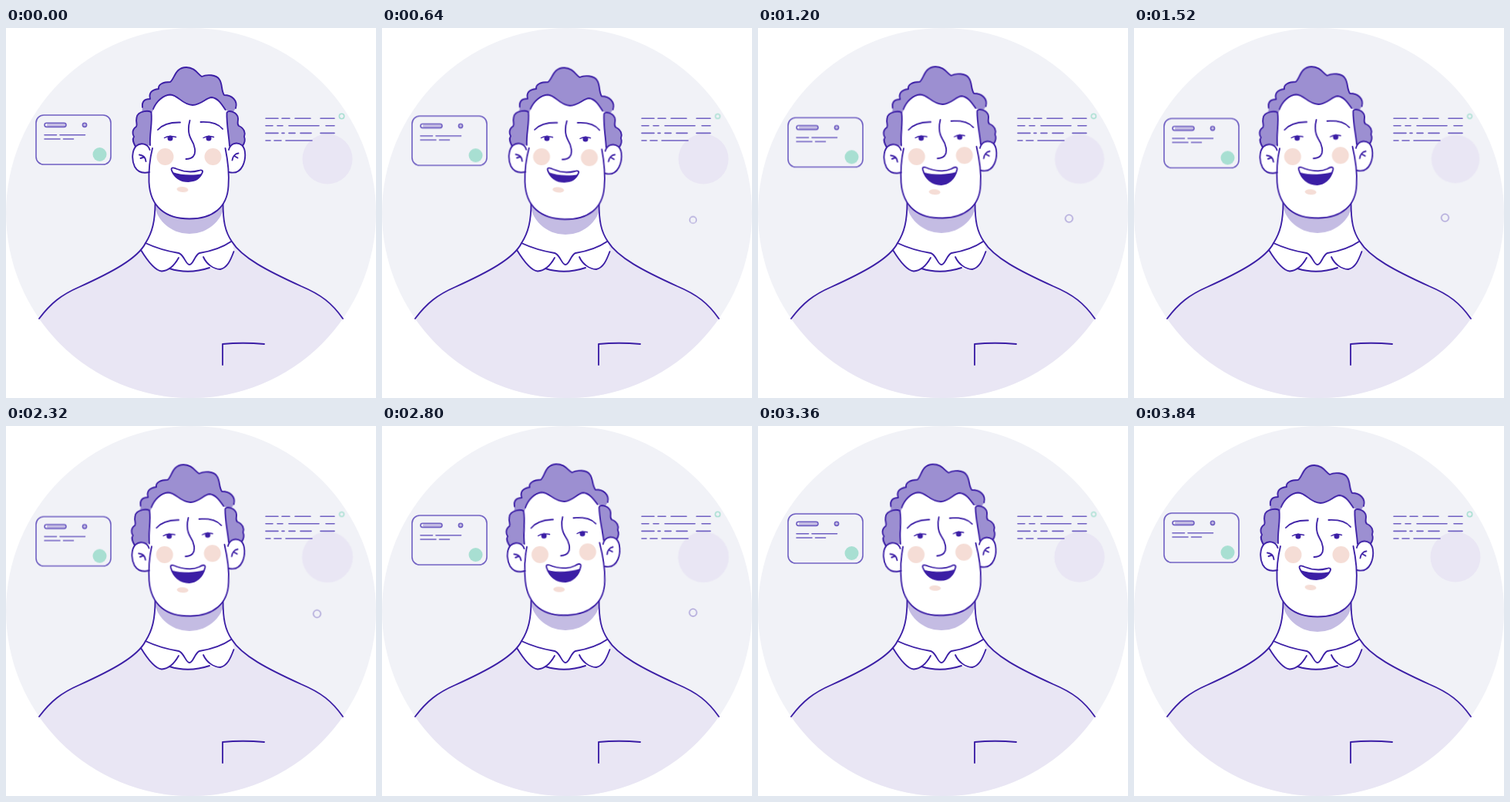
Write an HTML page that moves like this. It is 480x480 px and loops after 3.92 s.

```html
<!DOCTYPE html>
<html lang="en">
<head>
<meta charset="utf-8">
<title>Talking portrait</title>
<style>
  :root { --loop: 3920ms; --ink: #3b1ea5; --hair: #9c8fd1; --soft: #6f5fc2; --lilac: #e9e6f4; --shade: #c4bce3; --mint: #a8dfd2; }
  html, body { margin: 0; width: 100%; height: 100%; overflow: hidden; background: #fff; }
  svg { display: block; width: 100%; height: 100%; }
  .line { fill: none; stroke: var(--ink); stroke-width: 1.85; stroke-linecap: round; stroke-linejoin: round; }
  .skin { fill: #fff; }
  .hair { fill: var(--hair); }
  .blush { fill: #f5ddd6; }
  .thin { fill: none; stroke: var(--soft); stroke-width: 1.6; stroke-linecap: round; }
  .lid { stroke-width: 1.4; }

  .head, .nod, .card, .rise, .pop, .lip, .orb, .dot, .open, .shut, .mouth, .gape {
    animation-duration: var(--loop);
    animation-iteration-count: infinite;
    animation-timing-function: ease-in-out;
  }
  .head { animation-name: tilt; transform-origin: 203px 194px; }
  @keyframes tilt {
    0%, 100% { transform: rotate(0deg); }
    19.4% { transform: rotate(1.1deg); }
    29.3%, 57.9% { transform: rotate(-1.5deg); }
    78.6% { transform: rotate(-3.8deg); }
  }
  .nod { animation-name: nod; }
  @keyframes nod {
    0%, 100% { transform: translateY(0); }
    19.4% { transform: translateY(1px); }
    29.3%, 57.9% { transform: translateY(-1.2px); }
    78.6% { transform: translateY(-2.5px); }
  }

  .card { animation-name: bob; animation-timing-function: cubic-bezier(.364, 0, .636, 1); }
  @keyframes bob { 50% { transform: translateY(5px); } }

  .rise { animation-name: rise; animation-timing-function: linear; }
  @keyframes rise { from { transform: translate(403.5px, 251px); } to { transform: translate(403.5px, 238.5px); } }
  .pop { animation-name: pop; }
  @keyframes pop {
    0%, 9% { transform: scale(0); }
    16.3% { transform: scale(.9); }
    20%, 71% { transform: scale(1); }
    80.5%, 100% { transform: scale(0); }
  }

  .orb { animation-name: orb; transform-origin: 417px 170px; }
  @keyframes orb {
    0%, 25%, 100% { transform: scale(1); }
    39% { transform: scale(.96); }
    59% { transform: scale(1.015); }
  }
  .dot { animation-name: dot; animation-duration: calc(var(--loop) / 4); transform-origin: 435.5px 114.5px; }
  @keyframes dot { 50% { transform: scale(.9); } }

  .open, .shut { animation-timing-function: step-end; }
  .open { animation-name: open; }
  .shut { animation-name: shut; opacity: 0; }
  @keyframes open { 0% { opacity: 1; } 75.5% { opacity: 0; } 83.7%, 100% { opacity: 1; } }
  @keyframes shut { 0% { opacity: 0; } 75.5% { opacity: 1; } 83.7%, 100% { opacity: 0; } }

  .lip { animation-name: lip; }
  @keyframes lip {
    0%, 16.3%, 98%, 100% { transform: translateY(0); }
    28.6%, 74.5% { transform: translateY(4px); }
  }
  .mouth { animation-name: mouth; }
  @keyframes mouth {
    0%, 16.3%, 98%, 100% { d: path("M215 185C213 180 218 181 222 183C232 187 243 187 250 185C254 183.500 256 185 254.500 188C251 196 245 199 236.500 199C227 199 219 194 215 185Z"); }
    28.6%, 74.5% { d: path("M214 184C213 179 218 181 222 183C233 187 244 187 251 184C257 180.500 259 182 258.500 185C255 198 246 204 237.500 204C226 204 217 196 214 184Z"); }
  }
  .gape { animation-name: gape; }
  @keyframes gape {
    0%, 16.3%, 98%, 100% { d: path("M216 187C227 191 243 191.500 254.500 189C251 196 245 199 236.500 199C227 199 220 195 216 187Z"); }
    28.6%, 74.5% { d: path("M215 187.500C227 191.500 244 192 258 188C254 199 246 204 237.500 204C226 204 218 197 215 187.500Z"); }
  }
</style>
</head>
<body>
<svg viewBox="0 0 480 480">
  <defs>
    <clipPath id="disc"><circle cx="240" cy="240" r="240"/></clipPath>
    <clipPath id="throat"><path d="M193.500 215V228C193.500 250 190 265 181 279H293C284 265 281.500 250 281.500 226V215Z"/></clipPath>
  </defs>

  <circle cx="240" cy="240" r="240" fill="#f1f2f7"/>

  <!-- card -->
  <g class="card">
    <rect class="thin" x="39" y="113" width="97" height="64" rx="10"/>
    <rect x="53" y="123.300" width="25" height="5" rx="2.500" fill="var(--shade)"/>
    <rect class="thin" x="50" y="123.200" width="28" height="5.200" rx="2.600"/>
    <circle class="thin" cx="102" cy="125.800" r="2.600" style="fill: var(--shade)"/>
    <path class="thin" d="M50 138.700H65.500M70 138.700H102.500M50 144H70M74.500 144H87.500"/>
    <circle cx="121.500" cy="164" r="9" fill="var(--mint)"/>
  </g>

  <!-- notes -->
  <circle class="orb" cx="417" cy="170" r="32.500" fill="var(--lilac)"/>
  <path class="thin" d="M337 117.300H353M358 117.300H368M375 117.300H395M408 117.300H426
    M337 126.800H346M352 126.800H359M367 126.800H406M415 126.800H426
    M337 136.400H353M358 136.400H361M367 136.400H375M382 136.400H396M408 136.400H426
    M337 146H343M348 146H357M363 146H397"/>
  <circle class="dot" cx="435.500" cy="114.500" r="3.200" fill="none" stroke="var(--mint)" stroke-width="1.600"/>
  <g class="rise"><circle class="pop" r="4.800" fill="none" stroke="#a196d4" stroke-width="1.300"/></g>

  <!-- body -->
  <g clip-path="url(#disc)">
    <path fill="var(--lilac)" d="M181 279C171 299 137 317 95 336C72 346 58 357 43 377L-10 490H490L437 377C423 357 409 346 383 335C339 315 306 298 293 277Z"/>
  </g>
  <path class="skin" d="M193.500 215V228C193.500 250 190 265 181 279L175 288C186 306 195 315 202 315.500Q207 315 212 312Q237 320 264 311Q270 314 278 313C287 311 291 302 296 289L293 277C284 264 281.500 250 281.500 226V215Z"/>
  <g clip-path="url(#throat)"><ellipse class="nod" cx="238" cy="223" rx="46" ry="44" fill="var(--shade)"/></g>
  <g class="line">
    <path d="M193.500 226C193.500 250 190 265 181 279C171 299 137 317 95 336C72 346 58 357 43 377"/>
    <path d="M281.500 226C281.500 250 284 264 293 277C306 298 339 315 383 335C409 346 423 357 437 377"/>
    <path d="M181 279Q200 288 224 292C231 294 233 307 238 307C243 307 245 294 251 292Q276 288 292 277"/>
    <path d="M175 288C186 306 195 315 202 315.500C211 315 219 307 224 298"/>
    <path d="M256 297C260 306 269 313 278 313C287 311 291 302 295.500 290"/>
    <path d="M212 312Q237 320 264 311"/>
    <path d="M281 437V410Q307 407.500 335 410"/>
  </g>

  <!-- head -->
  <g class="head">
    <path class="skin" d="M189 108L200 80H278L287 108L290 152C288 170 289.500 185 288.500 205C287 233 268 247.500 238 247.500C207 247.500 187 232 185.500 200C185 185 187 170 187 152Z"/>
    <path class="hair" d="M177 104L186 98L192 105L188 112L176 110ZM284 106L290 98L298 104L294 110Z"/>
    <g class="line" style="fill: var(--hair)">
      <path d="M187 152C186 137 190 125 188.500 110C188 106 171 107 169.500 116C168 123 171 125 169 128C163 132 164 138 166 141C163 145 166 150 168 154"/>
      <path d="M290 153C289 138 286 125 286.500 110C287 106 300 108 301 117C301.500 121 299 124 302 127C309 130 311 136 309 141C311 146 309 150 307 153"/>
    </g>
    <g class="line" style="fill: #fff">
      <path d="M186.500 158C184 150 175 148 169 153C163 159 163 172 167 180C171 187 178 189 186 187"/>
      <path d="M289 158C291 150 299 147 306 152C312 158 311 171 307 179C303 187 297 189 289 187"/>
    </g>
    <g class="line">
      <path d="M173 164.500C178 165 181 168 181.500 173M174.500 169L179 167.500"/>
      <path d="M293.500 171.500C294 167 297 163 301.500 162.500M297 166.500L300.500 168.500"/>
      <path d="M190 156C187 168 185 185 185.500 200C187 232 207 247.500 238 247.500C268 247.500 287 233 288.500 205C290 185 287 168 284.500 156"/>
    </g>

    <path class="hair" d="M177 103C176 95 180 92 187 92C185 84 189 80 198 79C197 73 204 70 213 70C219 66 219 51 234 51C245 51 249 60 254 63C260 60 273 60 277 67C281 73 279 81 283 87C293 87 301 94 298 104L285 107C280 99 275 91 267 90C259 90.500 254 99.500 242 100C228 99.500 224 87 213 86.500C204 87 195 95 190 106Z"/>
    <g class="line">
      <path d="M177 103C176 95 180 92 187 92C185 84 189 80 198 79C197 73 204 70 213 70C219 66 219 51 234 51C245 51 249 60 254 63C260 60 273 60 277 67C281 73 279 81 283 87C293 87 301 94 298 104"/>
      <path d="M191 105C195 95 204 87 213 86.500C224 87 228 99.500 242 100C254 99.500 259 90.500 267 90C275 91 280 99 284.500 106"/>
    </g>

    <circle class="blush" cx="206.500" cy="167" r="11"/>
    <circle class="blush" cx="268.500" cy="167" r="11"/>
    <g transform="rotate(5 229 209.500)"><ellipse class="blush lip" cx="229" cy="209.500" rx="7.500" ry="3.500"/></g>

    <g class="line">
      <path d="M197 132Q206 122 226 122.500M252.500 122Q273 121 281 131"/>
      <path d="M238.500 120C236 129 236.500 138 240.500 145C245 152 247 162 243 166.500Q239.500 170 233.500 170"/>
    </g>
    <g class="open">
      <circle cx="213" cy="143" r="3.500" fill="var(--ink)"/>
      <circle cx="263" cy="143" r="3.500" fill="var(--ink)"/>
      <path class="line lid" d="M205.500 142.500Q211 139 220.500 141.500M256 142.500Q262 139 269.500 141.500"/>
    </g>
    <path class="line lid shut" d="M209.500 142Q213 144.500 217 142.500M260 142Q264 144.500 268 142.500"/>

    <path class="skin mouth"/>
    <path class="gape" fill="var(--ink)"/>
    <path class="line mouth"/>
  </g>
</svg>
</body>
</html>
```
